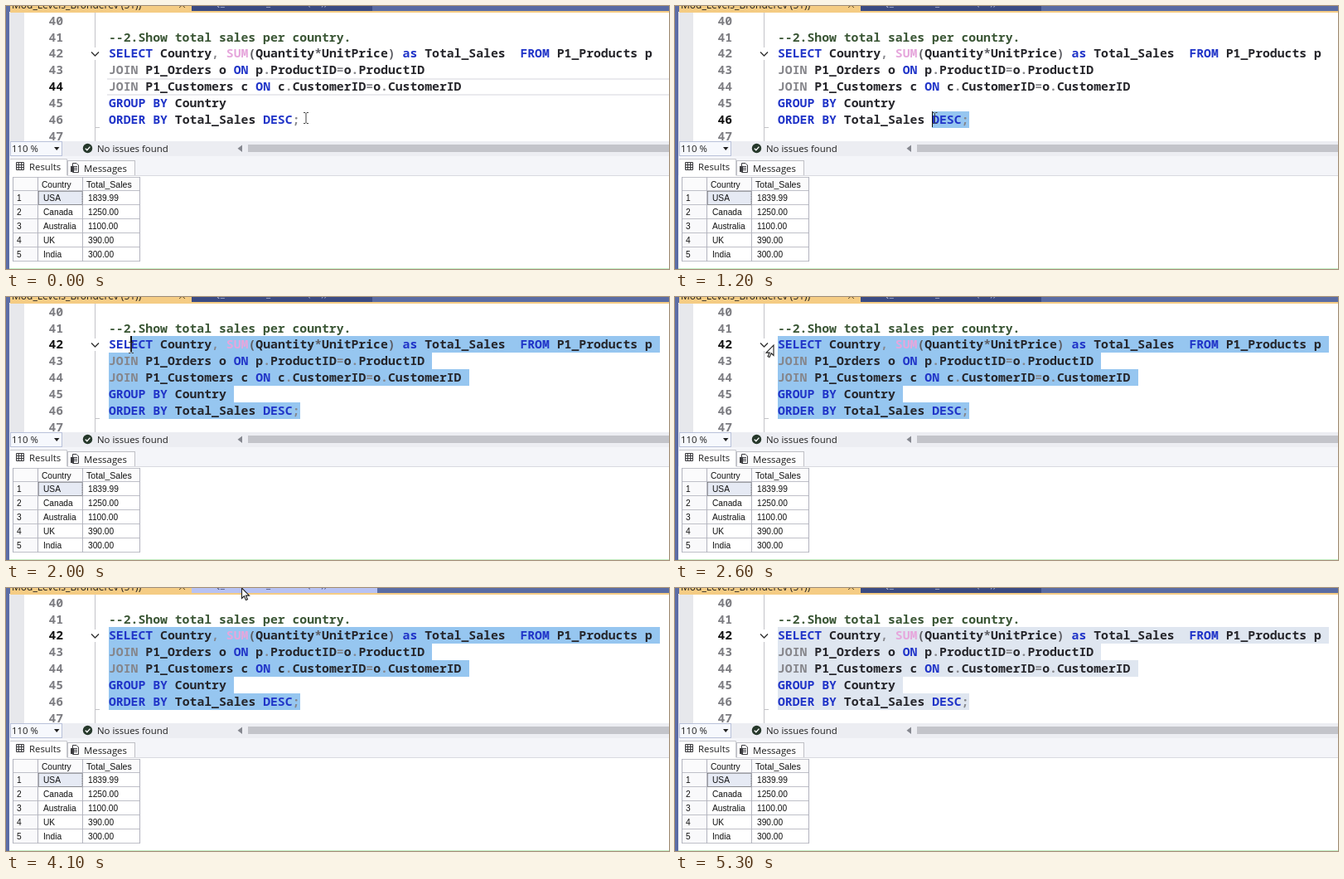
Write an HTML page that moves like this. It is 800x317 px and loops after 5400 ms.

```html
<!DOCTYPE html>
<html lang="en">
<head>
<meta charset="utf-8">
<title>Query editor</title>
<style>
html, body { margin: 0; width: 100%; height: 100%; overflow: hidden; background: #fff; }
svg { display: block; width: 100%; height: 100%; }
text { white-space: pre; }
rect { shape-rendering: crispEdges; }
.code { font: 600 14.78px "Noto Sans Mono", monospace; fill: #25252a; }
.ui { font: 11.4px "Open Sans", "Noto Sans", sans-serif; fill: #1e1e1e; }
.grid { font: 10.2px "Liberation Sans", Arial, sans-serif; fill: #111; }
.kw { fill: #2034c8; }
.op { fill: #5c5c62; }
.join { fill: #85858a; }
.fn { fill: #e6a6dc; }
.cm { fill: #3a5635; }
</style>
</head>
<body>
<svg id="stage" viewBox="0 0 800 317" preserveAspectRatio="none"></svg>
<script>
const NS = "http://www.w3.org/2000/svg";
const stage = document.getElementById("stage");
const LOOP = 5400, LEFT = 124, CHAR = 8.868, TOP = 47.3, ROW = 19.85;

function add(tag, attrs, parent = stage, content) {
  const el = document.createElementNS(NS, tag);
  for (const k in attrs) el.setAttribute(k, attrs[k]);
  if (content !== undefined) el.textContent = content;
  parent.appendChild(el);
  return el;
}
const box = (x, y, width, height, fill, parent, more) =>
  add("rect", { x, y, width, height, fill, ...more }, parent);
const path = (d, stroke, parent, more) =>
  add("path", { d, stroke, fill: "none", ...more }, parent);
const label = (x, y, cls, str, parent, more) =>
  add("text", { x, y, class: cls, ...more }, parent, str);
const show = (el, on) => el.setAttribute("visibility", on ? "visible" : "hidden");

// Code lines 42 to 46
const query = [
  "SELECT Country, SUM(Quantity*UnitPrice) as Total_Sales  FROM P1_Products p",
  "JOIN P1_Orders o ON p.ProductID=o.ProductID",
  "JOIN P1_Customers c ON c.CustomerID=o.CustomerID",
  "GROUP BY Country",
  "ORDER BY Total_Sales DESC;"
];
const rules = [
  ["kw", /^(SELECT|as|FROM|ON|GROUP|BY|ORDER|DESC)$/],
  ["op", /^[*()]$/],
  ["join", /^(JOIN|[,.=;])$/],
  ["fn", /^SUM$/]
];
const rowTop = row => Math.round(TOP + row * ROW);
const baseline = row => TOP + row * ROW + 15.1;

function codeLine(row, str) {
  const el = label(LEFT, baseline(row), "code", "");
  for (const word of str.match(/\w+|\s+|[^\w\s]/g)) {
    const rule = rules.find(r => r[1].test(word));
    add("tspan", rule ? { class: rule[0] } : {}, el, word);
  }
}

// Editor
box(0, 0, 800, 317, "#fff");
box(4, 8, 18, 155, "#e7e8ec");
const currentLine = path("M122 88H800M122 107H800", "#e4e4e9", stage, { "stroke-width": 1.3 });
const marks = query.map((_, row) =>
  box(0, rowTop(row), 0, rowTop(row + 1) - rowTop(row), "#96c6f0"));
path("M107.5 8V50M107.5 65V163M107.5 146.5H113", "#c4c4c8");
path("M103 55.5L107.5 60L112 55.5", "#333", stage, { "stroke-width": 1.4 });
const numbers = {};
for (let n = 40; n <= 47; n++)
  numbers[n] = label(51.5, baseline(n - 42), "code", n);
label(LEFT, baseline(-1), "code cm", "--2.Show total sales per country.");
query.forEach((str, row) => codeLine(row, str));
const caret = box(0, 0, 1.5, 19, "#111");

// Document tabs
box(0, 0, 800, 7, "#5a6ca3");
const otherTab = box(224, 0, 218, 6, "#3b4b82");
const otherName = label(250, 0, "ui", "Q_Marvelon_Practice (58))");
box(5, 0, 219, 7, "#f5cc84");
box(5, 6, 795, 2, "#f5cc84");
const docName = label(7, 3, "ui", "", stage, { style: "font-size:12px" });
path("M209 -4L216 2M216 -4L209 2", "#5b4a2c");

// Status strip
box(0, 163, 800, 18, "#ecedf2");
box(5.5, 163.5, 62, 17, "#f6f8fd", stage, { stroke: "#b9c1da" });
label(7, 176, "ui", "110 %");
add("path", { d: "M58 170H64.5L61.2 174Z", fill: "#222" });
add("circle", { cx: 98.5, cy: 171.5, r: 5.7, fill: "#26382b" });
path("M95.7 171.6L97.8 173.7L101.4 169.6", "#fff", stage, { "stroke-width": 1.3 });
label(110, 176, "ui", "No issues found");
add("path", { d: "M285 167.5V176L279.5 171.7Z", fill: "#85878f" });
box(292, 167, 508, 9, "#c3c4ca");

// Results pane
box(0, 181, 800, 136, "#f4f5f9");
const pane = box(0, 204, 800, 113, "#fff");
box(5, 184, 68, 21, "#fff");
path("M5 184.5H73.5V204", "#c8c9cf");
box(74.5, 186.5, 81, 17.5, "#fcfcfd", stage, { stroke: "#bfc0c6" });
path("M73.5 204.5H800", "#d9dae0");
path("M12.5 188.5H21.5V197.5H12.5ZM12.5 191.5H21.5M12.5 194.5H21.5M15.5 188.5V197.5M18.5 188.5V197.5",
  "#3c3c40");
label(28, 198, "ui", "Results");
path("M80.5 189.5H85L87.5 192V200.5H80.5ZM82 193.5H86M82 195.5H86M82 197.5H86", "#3c3c40");
box(77.5, 193, 4, 7, "#3c3c40");
label(94, 200, "ui", "Messages");

const table = add("g", {});
const rows = [["USA", "1839.99"], ["Canada", "1250.00"], ["Australia", "1100.00"],
  ["UK", "390.00"], ["India", "300.00"]];
box(8, 206, 154, 17, "#fbfbfc", table);
box(8, 223, 31, 85, "#f9f9fb", table);
box(39, 223, 54, 17, "#e6eaf4", table);
for (let i = 0; i <= 6; i++)
  path(`M8 ${206.5 + (i ? i * 17 - 1 : 0)}H162`, "#bfc0c8", table);
for (const x of [8.5, 38.5, 92.5, 161.5]) path(`M${x} 206V308`, "#b2b3be", table);
path("M39.5 223.5H92V239.5H39.5Z", "#555", table, { "stroke-dasharray": "1 1" });
label(43, 218.5, "grid", "Country", table);
label(97, 218.5, "grid", "Total_Sales", table, { style: "font-size:10.6px" });
rows.forEach(([country, total], i) => {
  const y = 235.2 + i * 17;
  label(13, y, "grid", i + 1, table);
  label(45, y, "grid", country, table);
  label(99, y, "grid", total, table);
});
box(0, 316, 800, 1, "#c4edc2");
box(0, 0, 4, 317, "#5c6da6");

// Pointers
const pointers = {
  beam: add("g", {}),
  arrow: add("g", {}),
  mirrored: add("g", {})
};
path("M-3 -6.5H-1L0 -5.5L1 -6.5H3M0 -5.5V5.5M-3 6.5H-1L0 5.5L1 6.5H3", "#444", pointers.beam);
const arrowShape = "M0 0V12.5L2.9 9.8L5 14.6L7 13.7L4.9 9.1H9Z";
for (const [name, flip] of [["arrow", 1], ["mirrored", -1]])
  add("path", { d: arrowShape, fill: "#fff", stroke: "#222", "stroke-width": 1.1,
    transform: `scale(${flip} 1)` }, pointers[name]);

// Pointer route: time, x, y
const route = [
  [0, 362, 135], [600, 362, 135], [800, 356, 135], [1200, 313.5, 135],
  [1500, 270, 118], [1800, 185, 79], [1900, 166, 66], [2000, 151, 61],
  [2300, 121, 59], [2400, 119, 58], [3600, 119, 58], [4100, 284.5, 0],
  [4300, 300, -24], [LOOP, 300, -24]
];

function pointerAt(t) {
  const i = Math.max(1, route.findIndex(k => k[0] > t));
  const [a, b] = [route[i - 1], route[i]];
  const u = (t - a[0]) / (b[0] - a[0]);
  return [a[1] + (b[1] - a[1]) * u, a[2] + (b[2] - a[2]) * u];
}

function caretAt(t) {
  if (t >= 2300) return [0, 0];
  const [x, y] = pointerAt(t);
  const row = Math.max(0, Math.min(4, Math.floor((y - TOP) / ROW)));
  const col = Math.round((x - LEFT) / CHAR);
  return [row, Math.max(0, Math.min(query[row].length, col))];
}

function draw(time) {
  const t = Math.floor(time / 100) * 100;
  const [x, y] = pointerAt(t);
  const [row, col] = caretAt(t);
  const dragged = t >= 800;
  const running = t >= 3100 && t < 3600;
  const pale = (t >= 3000 && t < 3600) || t >= 5000;
  const hover = t >= 4000 && t < 4300;

  const kind = y < 8 ? "arrow" : x < LEFT ? "mirrored" : "beam";
  for (const name in pointers) show(pointers[name], name === kind);
  pointers[kind].setAttribute("transform", `translate(${x} ${y})`);

  marks.forEach((mark, i) => {
    const from = i === row ? col : 0;
    const to = query[i].length + (i < 4 ? 1 : 0);
    mark.setAttribute("x", LEFT + from * CHAR);
    mark.setAttribute("width", (to - from) * CHAR);
    mark.setAttribute("fill", pale ? "#dfe6f0" : "#96c6f0");
    show(mark, dragged && i >= row && to > from);
  });
  show(currentLine, !dragged);
  caret.setAttribute("x", LEFT + col * CHAR - 0.5);
  caret.setAttribute("y", rowTop(row));
  show(caret, dragged && t < 2300);

  const active = dragged ? 42 + row : 44;
  for (const n in numbers) {
    const on = +n === active;
    numbers[n].style.fill = on ? "#111" : "#7d7d82";
    numbers[n].style.fontWeight = on ? 700 : 600;
  }

  docName.textContent = running ? "Mod_Levels_Br Executing..." : "Mod_Levels_Bronderev (51))";
  otherTab.setAttribute("fill", hover ? "#b7c2f3" : "#3b4b82");
  otherTab.setAttribute("width", hover ? 224 : 218);
  otherName.style.fill = hover ? "#3b4570" : "#b9c1dc";
  show(table, !running);
  pane.setAttribute("fill", running ? "#f8f8fd" : "#fff");
}

function tick() {
  draw(performance.now() % LOOP);
  requestAnimationFrame(tick);
}
tick();
</script>
</body>
</html>
```
